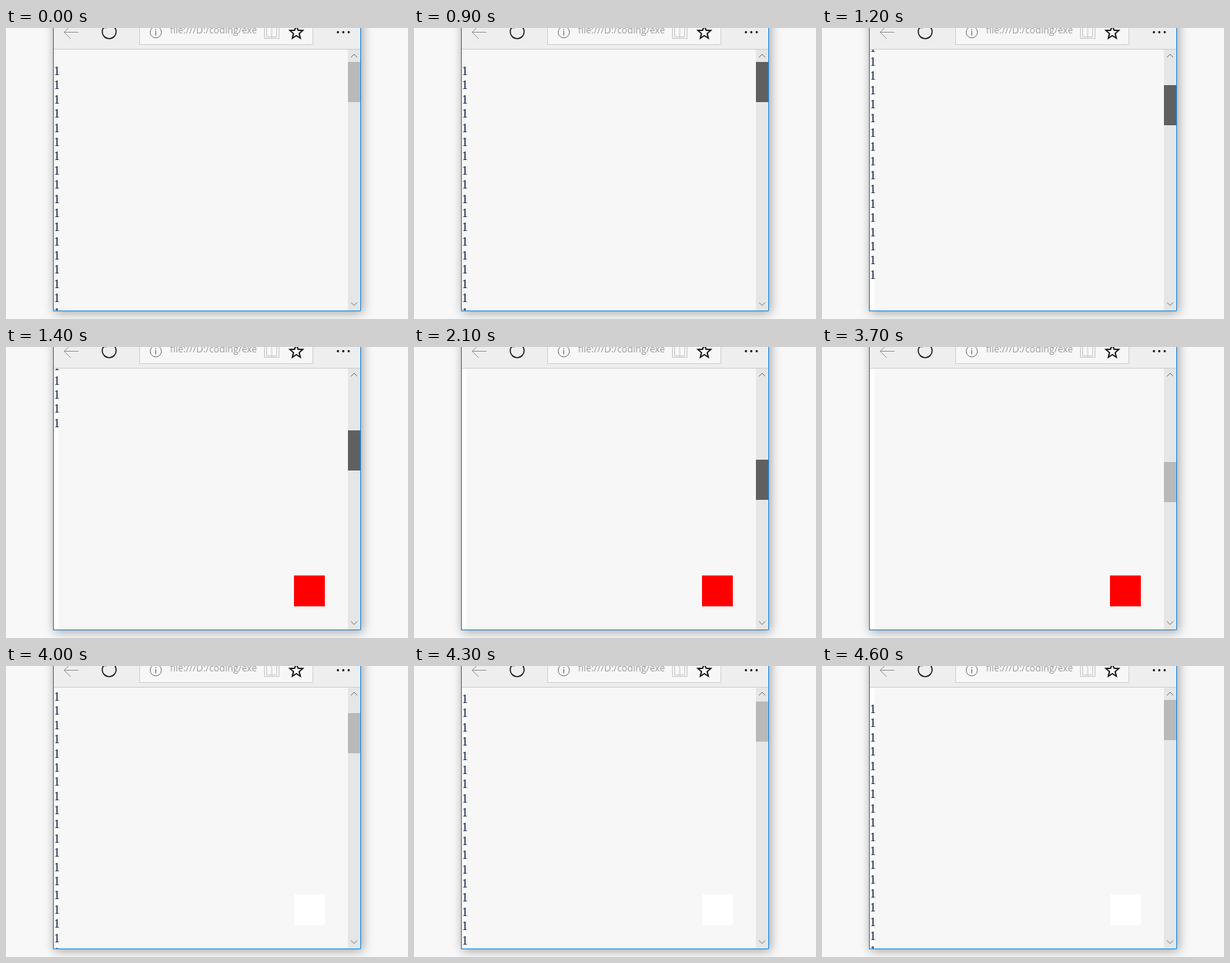
These frames come from a looping animation (522x377 px, 6200 ms). An HTML page:

```html
<!DOCTYPE html>
<html lang="en">
<head>
<meta charset="utf-8">
<title>Back to top</title>
<style>
  html, body { margin: 0; width: 100%; height: 100%; overflow: hidden; background: #f8f8f8; }
  .window { position: absolute; left: 61px; top: -40px; width: 400px; height: 407px;
    background: #f7f7f7; box-shadow: 2px 2px 13px rgba(0, 0, 0, .36); }
  svg { position: absolute; left: 0; top: 0; display: block; }
  .line { fill: none; stroke: #111; }
  .page { font: 16px "Liberation Serif", "Times New Roman", serif; fill: #061440; }
  .address { font: 12.25px "Open Sans", sans-serif; fill: #999; }
</style>
</head>
<body>
<div class="window"></div>
<svg width="522" height="377" viewBox="0 0 522 377">
  <clipPath id="view"><rect x="62" y="28" width="398" height="338"/></clipPath>

  <!-- toolbar -->
  <rect x="62" y="0" width="398" height="27" fill="#eeeeee"/>
  <rect x="62" y="27" width="398" height="1" fill="#d0d0d0"/>
  <rect x="173.5" y="-9.5" width="225" height="31" fill="#f7f7f7" stroke="#d2d2d2"/>
  <path class="line" d="M94 5.5H75.5M84 -3L75.5 5.5L84 14" style="stroke:#999"/>
  <path class="line" d="M129 -2.6A9 9 0 1 0 139 -2.6M125.5 -.5H130V-5" stroke-width="1.4"/>
  <circle class="line" cx="194.5" cy="5.5" r="7.3" style="stroke:#777"/>
  <path class="line" d="M194.5 4V9.5M194.5 1.5V2.8" style="stroke:#666"/>
  <text class="address" x="213" y="7">file:///D:/coding/exe</text>
  <path class="line" d="M335.5 -3V13.5H354.5V-3M338.5 -3V11.5H351.5V-3M345 -3V13.5" style="stroke:#c8c8c8"/>
  <path id="star" class="line" stroke-width="1.7"/>
  <g fill="#111">
    <circle cx="431" cy="5.5" r="1.4"/><circle cx="438" cy="5.5" r="1.4"/><circle cx="445" cy="5.5" r="1.4"/>
  </g>

  <!-- page -->
  <g clip-path="url(#view)">
    <rect id="trail" x="62" y="28" width="6" height="338" fill="#fff"/>
    <g id="lines" class="page"></g>
    <rect id="button" x="374" y="296" width="40" height="40"/>
  </g>

  <!-- scrollbar -->
  <rect x="444" y="28" width="16" height="338" fill="#e6e6e6"/>
  <path class="line" d="M448 38L452 34L456 38M448 355.5L452 359.5L456 355.5" style="stroke:#777"/>
  <rect id="thumb" x="444" width="16" height="52"/>

  <path class="line" d="M61.5 0V366" style="stroke:#5c6c7c"/>
  <path class="line" d="M460.5 0V366.5H61" style="stroke:#1f8ade"/>
</svg>
<script>
const $ = id => document.getElementById(id);
const LOOP = 6200, STEP = 100, RATIO = 6.52, TOP = 44, LINES = 26;
const BOTTOM = 1180, SHOW_AT = 300;

// Thumb positions while dragging, one per step
const firstDrag = [44, 48, 58, 74, 92, 108, 121, 122, 123];
const secondDrag = [128, 146, 170, 194, 214, 225];

const star = [...Array(10).keys()].map(i => {
  const r = i % 2 ? 3.9 : 8.8, a = i * Math.PI / 5 - Math.PI / 2;
  return `${377 + r * Math.cos(a)} ${6 + r * Math.sin(a)}`;
});
$("star").setAttribute("d", `M${star.join("L")}Z`);

for (let i = 0; i < LINES; i++) {
  const text = document.createElementNS("http://www.w3.org/2000/svg", "text");
  text.textContent = "1";
  text.setAttribute("x", 62);
  text.setAttribute("y", Math.round(61 + i * 18.39));
  $("lines").append(text);
}

const pick = (list, i) => list[Math.min(i, list.length - 1)];

// Each tick of the return takes a sixth of the remaining distance
function returnScroll(ticks) {
  let y = BOTTOM;
  while (ticks-- > 0 && y > 0) y -= Math.ceil(y / 6);
  return y;
}

function scrollAt(t) {
  if (t >= 3700) return returnScroll(Math.floor(3 + (t - 3700) / STEP * 3.5));
  const y = t < 900 ? TOP
    : t < 2000 ? pick(firstDrag, (t - 900) / STEP)
    : pick(secondDrag, (t - 2000) / STEP);
  return (y - TOP) * RATIO;
}

function thumbColor(t) {
  if (t < 100 || t >= 2600) return "#b9b9b9";
  return t < 900 ? "#a6a6a6" : "#606060";
}

function draw(now) {
  const t = Math.floor(now % LOOP / STEP) * STEP;
  const scroll = scrollAt(t);
  $("lines").setAttribute("transform", `translate(0 ${-Math.round(scroll)})`);
  $("thumb").setAttribute("y", Math.round(TOP + scroll / RATIO));
  $("thumb").setAttribute("fill", thumbColor(t));
  // Cleared areas stay white until the loop restarts
  $("button").setAttribute("fill", scroll > SHOW_AT ? "#f00" : t >= 3700 ? "#fff" : "none");
  $("trail").setAttribute("opacity", t >= 1000 ? 1 : 0);
}

const start = performance.now();
function frame() {
  draw(performance.now() - start);
  requestAnimationFrame(frame);
}
frame();
</script>
</body>
</html>
```
